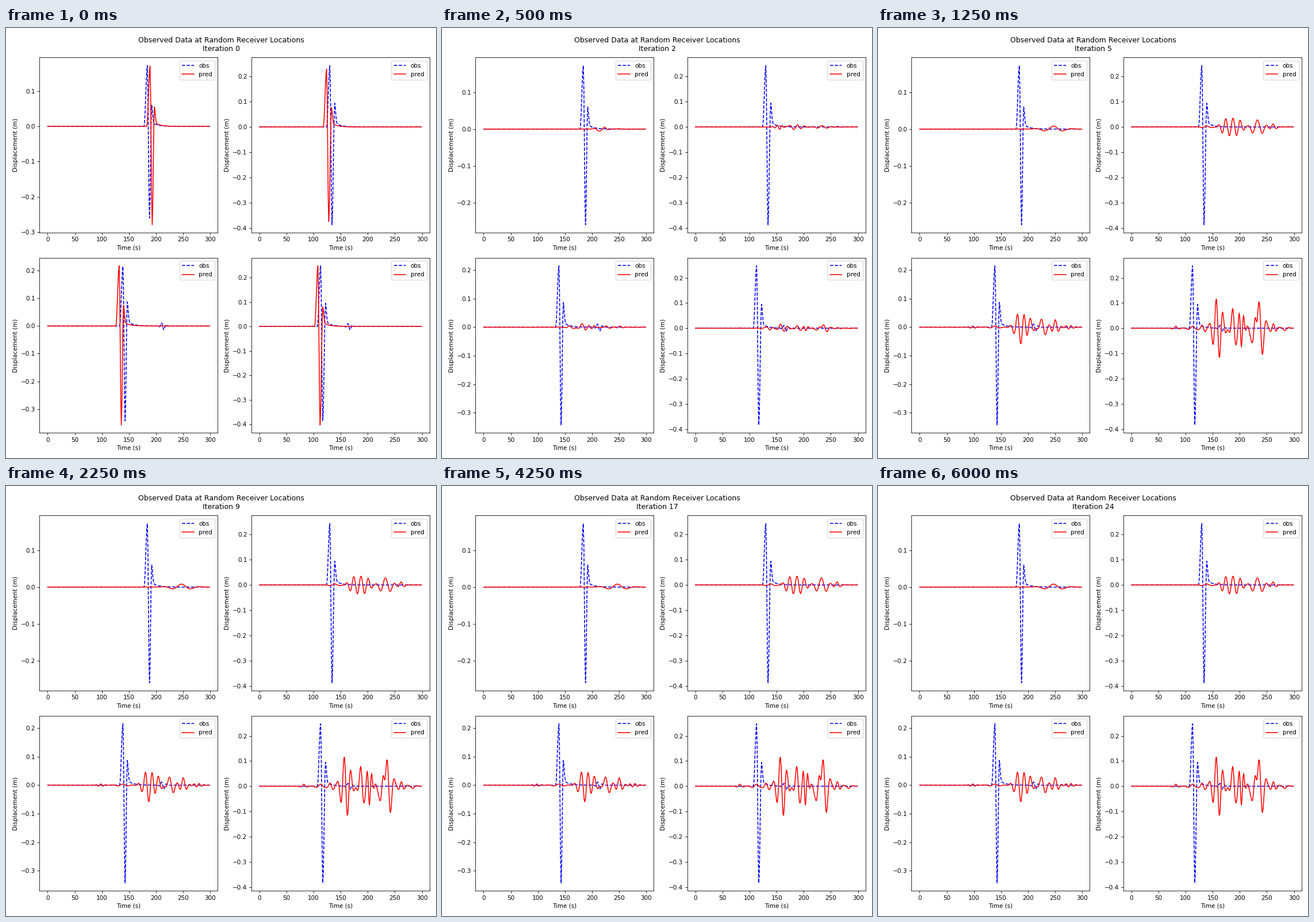
These frames come from a looping animation (748x748 px, 6250 ms). A matplotlib script:

```python
import numpy as np
import matplotlib.pyplot as plt
from matplotlib.animation import FuncAnimation

SIZE = 748
FRAMES, INTERVAL = 25, 250
T = np.arange(300)


def pulse(t0, top, low, after, gap=8):
    """Main arrival: eased peak, trough and second peak, then a slow tail."""
    end = t0 + gap
    step = np.interp(T, [t0 - 6, t0, t0 + 4, end], range(4))
    s = step % 1
    step = step - s + s * s * (3 - 2 * s)
    y = np.interp(step, range(4), [0, top, low, after])
    u = np.maximum(T - end, 0)
    tail = .8 * np.exp(-(u / 2.3) ** 2) + .2 * np.exp(-u / 10)
    return np.where(T > end, after * tail, y)


def wave(peak, amp, period, width, mid=None, power=2):
    """Cosine packet with a bell envelope, amplitude in millimetres."""
    u = np.abs(T - (peak if mid is None else mid)) / width
    return amp / 1000 * np.cos(2 * np.pi * (T - peak) / period) * np.exp(-u ** power)


def packets(*specs):
    return sum(wave(*spec) for spec in specs)


def echo(t0):
    return wave(t0 + 4.6, -15, 9.2, 5.5, t0 + 3)


observed = [
    pulse(184, .1725, -.260, .060),
    pulse(130, .2425, -.386, .094, 9),
    pulse(139, .2155, -.343, .087) + echo(210),
    pulse(113, .248, -.384, .095, 9) + echo(163),
]
initial = [
    pulse(189, .171, -.279, .055),
    pulse(124, .228, -.373, .077, 9),
    pulse(132, .218, -.358, .075),
    pulse(108, .248, -.403, .080, 9),
]
first = [
    packets((213, -19, 22, 9), (223.5, 13, 14, 6), (239.5, 3, 9, 6)),
    packets((155.3, -30, 9, 9), (169, 18, 21, 10), (181, -9, 14, 6),
            (198, 6, 10, 16)),
    packets((158, 11, 13, 6), (167, -16, 20, 8), (182, 19, 19, 10),
            (203, 6, 8, 12)),
    packets((128, 11, 20, 7), (138.5, -20, 13, 7), (146, -18, 13, 7),
            (155, 14, 24, 5), (163, 13, 9, 7)),
]
settled = [
    packets((247, 8, 36, 24)),
    packets((139, 4, 20, 14), (187.5, 35, 13.4, 22, 185, 4),
            (232.5, 28, 18.5, 15, 233, 4), (261.5, 12, 13, 8)),
    packets((98, 4.5, 9, 8), (139, 4, 20, 14), (186.7, -59, 13, 13),
            (203.6, 27, 16, 8), (224.3, 33, 16.5, 9, 228),
            (250.3, 26.5, 13, 8), (270, 6.5, 9.5, 11, 276)),
    packets((82, 8, 14, 6), (113, 8, 18, 12), (130, 14, 12, 8, 134),
            (156.4, 127, 12.4, 11, 159.5), (186.5, 88, 13.5, 7, 189),
            (203, -75, 8.6, 6.5), (222, -45, 24, 8), (228.5, 80, 14, 5),
            (235, 128, 14.5, 9, 238), (262, 18, 11, 8), (283, -9, 18, 7)),
]
# On the way to the settled traces: slightly late, with other gains
third = [gain * np.roll(y, 1) for gain, y in zip((.6, 1.2, .97, .87), settled)]
second = [.3 * a + .15 * b for a, b in zip(first, third)]
stages = [initial, first, second, third, settled]

fig, grid = plt.subplots(2, 2, figsize=(10, 10), dpi=SIZE / 10)
axes = grid.ravel()
title = fig.suptitle("")
preds = []
for ax, obs in zip(axes, observed):
    ax.plot(T, obs, "b--", label="obs")
    preds += ax.plot(T, initial[0], "r", label="pred")
    ax.set_xlabel("Time (s)")
    ax.set_ylabel("Displacement (m)")
    ax.yaxis.set_major_locator(plt.MultipleLocator(.1))
    ax.legend(loc="upper right")


def show(k):
    title.set_text(f"Observed Data at Random Receiver Locations\nIteration {k}")
    for ax, line, y in zip(axes, preds, stages[min(k, 4)]):
        line.set_ydata(y)
        ax.relim()
        ax.autoscale_view()


# Fit the panels at 100 dpi, once for the first view and again for the rest
layouts = []
fig.set_dpi(100)
for k in range(2):
    show(k)
    fig.tight_layout()
    layouts.append([ax.get_position() for ax in axes])
fig.set_dpi(SIZE / 10)


def update(k):
    show(k)
    for ax, box in zip(axes, layouts[min(k, 1)]):
        ax.set_position(box)
    return preds


anim = FuncAnimation(fig, update, frames=FRAMES, interval=INTERVAL,
                     repeat=True, repeat_delay=0, blit=False)
plt.show()
```
